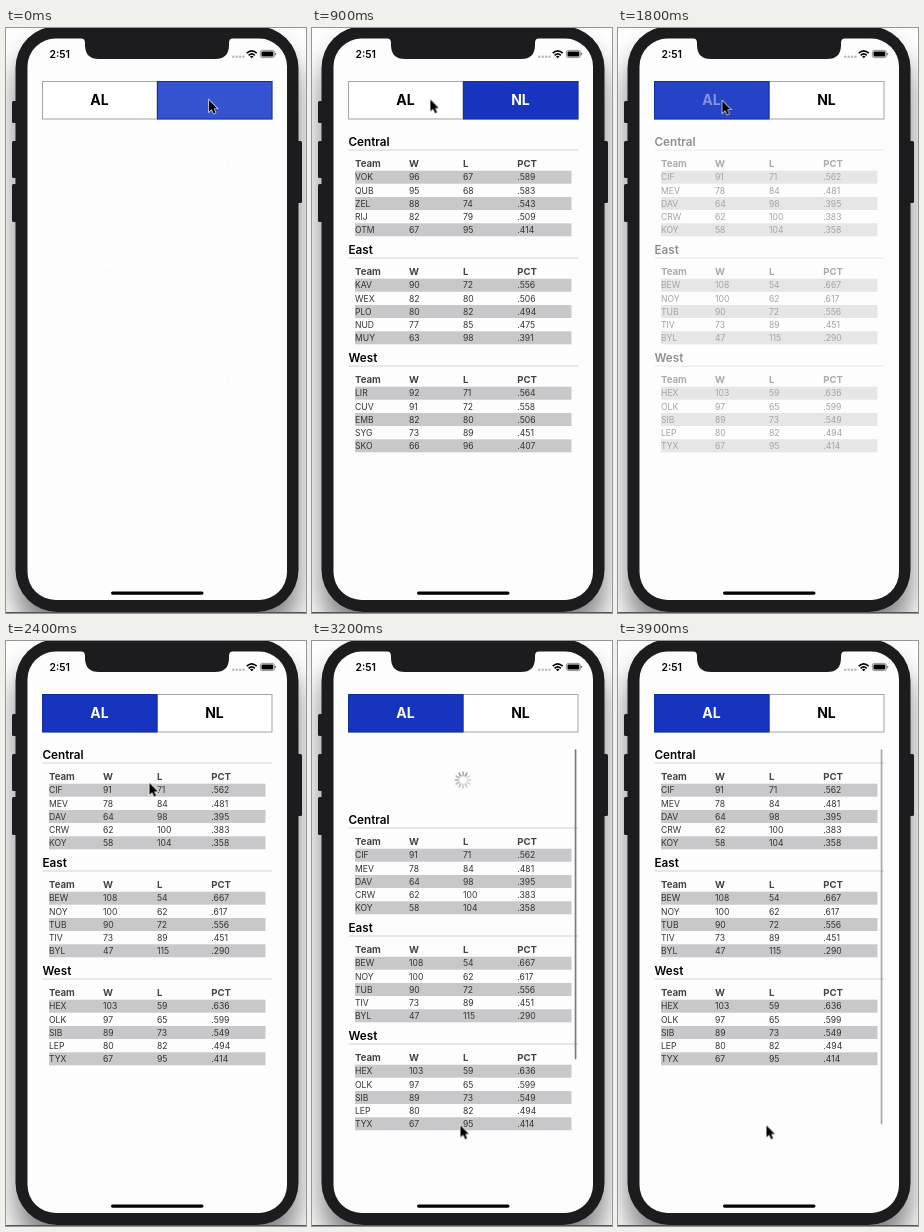
Animation of 300 by 585 pixels, one loop 4000 ms. Source, as an HTML page:

```html
<!DOCTYPE html>
<html lang="en">
<head>
<meta charset="utf-8">
<title>Standings</title>
<style>
@property --pull {
  syntax: '<length>';
  inherits: true;
  initial-value: 0px;
}
html, body {
  margin: 0;
  width: 100%;
  height: 100%;
  overflow: hidden;
  background: #fff;
}
#stage {
  position: relative;
  width: 300px;
  height: 585px;
  overflow: hidden;
  animation: pull 4s linear infinite;
}
#stage > svg { position: absolute; left: 0; top: 0; }
text { font-family: Inter, Roboto, sans-serif; }
.body { filter: drop-shadow(0 22px 14px rgba(0, 0, 0, .5)); }
.time { font-size: 10.3px; font-weight: 600; }
.label { font-size: 14px; font-weight: 700; text-anchor: middle; }
.title { font-size: 11.7px; font-weight: 600; }
.head { font-size: 9.6px; font-weight: 700; fill: #444; }
.cell { font-size: 8.6px; fill: #333; }
.stripe { fill: #c8c8ca; }
.rule { fill: #cfcfd3; }

.nl { animation: showNl 4s step-end infinite; }
.al { animation: showAl 4s step-end infinite; }
.btn { stroke: #1030a0; animation: press 4s ease-in-out infinite; }
.fade { animation: reveal 4s ease-in-out infinite; }
.al .btn, .al .fade { animation-delay: -2.5s; }
.al .list { transform: translateY(var(--pull)); }
.bar {
  fill: #7c7c80;
  height: calc(375px - var(--pull));
  animation: bar 4s linear infinite;
}
.refresh {
  position: absolute;
  left: 142px;
  top: 106px;
  width: 18px;
  height: var(--pull);
  overflow: hidden;
  animation: refresh 4s linear infinite;
}
.refresh svg {
  position: absolute;
  left: 0;
  top: calc(50% - 9px);
  animation: spin 1s steps(12) infinite;
}
.cursor { animation: cursor 4s linear infinite; }

@keyframes showNl { 0% { opacity: 1 } 37.5%, 100% { opacity: 0 } }
@keyframes showAl { 0% { opacity: 0 } 37.5%, 100% { opacity: 1 } }
@keyframes press { 0% { fill: #3552d0 } 15%, 100% { fill: #1634be } }
@keyframes reveal { 0% { opacity: .008 } 16.25%, 100% { opacity: 1 } }
@keyframes pull {
  0%, 65% { --pull: 0px }
  67.5% { --pull: 31px }
  70% { --pull: 82px }
  72.5% { --pull: 123px }
  74.5%, 75.5% { --pull: 134px; animation-timing-function: ease-out }
  80%, 81.25% { --pull: 65px; animation-timing-function: ease-in-out }
  88.75%, 100% { --pull: 0px }
}
@keyframes bar {
  0%, 65.5% { opacity: 0 }
  66.5%, 96.25% { opacity: 1 }
  100% { opacity: 0 }
}
@keyframes refresh {
  0%, 66% { opacity: 0 }
  72%, 82% { opacity: 1 }
  88.75%, 100% { opacity: 0 }
}
@keyframes spin { to { transform: rotate(360deg) } }
@keyframes cursor {
  0%, 17.5% { transform: translate(203px, 72px) }
  20% { transform: translate(162px, 72px) }
  22.5% { transform: translate(118.5px, 71.5px) }
  25% { transform: translate(109px, 72.5px) }
  30% { transform: translate(106px, 73.5px) }
  32.5%, 54% { transform: translate(104.5px, 73px) }
  57.5% { transform: translate(126px, 108px) }
  60%, 65% { transform: translate(143.5px, 142px) }
  67.5% { transform: translate(144.5px, 202px) }
  70% { transform: translate(146px, 322px) }
  72.5% { transform: translate(148px, 442px) }
  74.5%, 100% { transform: translate(148.5px, 484.5px) }
}
</style>
</head>
<body>
<div id="stage"></div>
<script>
const leagues = {
  nl: {
    Central: 'VOK 96 67 .589|QUB 95 68 .583|ZEL 88 74 .543|RIJ 82 79 .509|OTM 67 95 .414',
    East: 'KAV 90 72 .556|WEX 82 80 .506|PLO 80 82 .494|NUD 77 85 .475|MUY 63 98 .391',
    West: 'LIR 92 71 .564|CUV 91 72 .558|EMB 82 80 .506|SYG 73 89 .451|SKO 66 96 .407'
  },
  al: {
    Central: 'CIF 91 71 .562|MEV 78 84 .481|DAV 64 98 .395|CRW 62 100 .383|KOY 58 104 .358',
    East: 'BEW 108 54 .667|NOY 100 62 .617|TUB 90 72 .556|TIV 73 89 .451|BYL 47 115 .290',
    West: 'HEX 103 59 .636|OLK 97 65 .599|SIB 89 73 .549|LEP 80 82 .494|TYX 67 95 .414'
  }
};
const columns = [43, 97, 151, 205.3];
const tabs = { al: 36.5, nl: 151.5 };

const text = (cls, x, y, str, fill = '') =>
  `<text class="${cls}" x="${x}" y="${y}"${fill && ` fill="${fill}"`}>${str}</text>`;
const rect = (x, y, w, h, attrs = '') =>
  `<rect x="${x}" y="${y}" width="${w}" height="${h}" ${attrs}/>`;
const cells = (cls, y, values) =>
  values.map((v, i) => text(cls, columns[i], y, v)).join('');
const label = (id, fill) => text('label', tabs[id] + 57, 77.4, id.toUpperCase(), fill);

function section([name, rows], i) {
  const y = 108 * i;
  const lines = rows.split('|').map((row, n) => {
    const top = 142.7 + y + n * 13.15;
    const stripe = n % 2 ? '' : rect(43, top, 216.5, 13, 'class="stripe"');
    return stripe + cells('cell', top + 9.7, row.split(' '));
  });
  return text('title', 36.5, 118.4 + y, name) +
    rect(36.5, 121.5 + y, 229.5, 1, 'class="rule"') +
    cells('head', 139.2 + y, ['Team', 'W', 'L', 'PCT']) + lines.join('');
}

const tab = id =>
  rect(tabs[id], 53.5, 114.5, 37.5, 'fill="#fff" stroke="#a3a3aa"') + label(id, '#000');

const page = id => `<g class="${id}">
  ${rect(tabs[id], 53.5, 114.5, 37.5, 'class="btn"')}
  <g class="fade">${label(id, '#fff')}</g>
  <g class="fade list">${Object.entries(leagues[id]).map(section).join('')}</g>
</g>`;

const phone = `
  ${rect(9.5, -2, 283, 586, 'rx="42" fill="#1c1c1f" class="body"')}
  ${[[6, 73, 22], [6, 113, 37], [6, 156, 38], [291, 113, 62]].map(([x, y, h]) =>
    rect(x, y, 5, h, 'rx="1.5" fill="#1c1c1f"')).join('')}
  ${rect(0, 584, 300, 1, 'fill="#555"')}
  ${rect(21.5, 10.5, 259.5, 561.5, 'rx="28" fill="#fefdfe"')}
  <path d="M75 10H227Q223 10.5 223 15V17Q223 31 209 31H93Q79 31 79 17V15Q79 10.5 75 10Z" fill="#1c1c1f"/>
  ${rect(105, 563.5, 92.5, 3.2, 'rx="1.6"')}`;

const status = text('time', 43.5, 29.8, '2:51') +
  [227.3, 230.7, 234.1, 237.5].map(x => `<circle cx="${x}" cy="28.8" r="1.2" fill="#b8b8bc"/>`).join('') +
  `<g fill="none" stroke="#000" stroke-width="1.6">
    <path d="M240.7 25.2Q245.7 20.6 250.7 25.2M242.6 27.3Q245.7 24.4 248.8 27.3"/>
    ${rect(254.4, 22.4, 14, 7.2, 'rx="2" stroke="#777" stroke-width=".8"')}
  </g>
  <path d="M243.9 28.4Q245.7 26.9 247.5 28.4L245.7 30.2Z"/>
  ${rect(255.5, 23.5, 11.8, 5, 'rx="1"')}
  ${rect(269.1, 24.7, 1, 2.6, 'rx=".5" fill="#777"')}`;

const spokes = Array.from({ length: 12 }, (_, i) =>
  `<path d="M9 1V4.6" stroke-opacity="${0.35 + 0.055 * i}" transform="rotate(${i * 30} 9 9)"/>`).join('');

document.getElementById('stage').innerHTML = `
<svg width="300" height="585">
  ${phone}${status}${tab('al')}${tab('nl')}${page('nl')}${page('al')}
  ${rect(262.7, 108.3, 1.7, 375, 'rx=".85" class="bar"')}
</svg>
<div class="refresh">
  <svg width="18" height="18" stroke="#77777c" stroke-width="1.3" stroke-linecap="round">${spokes}</svg>
</div>
<svg width="300" height="585">
  <path class="cursor" d="M0 0V11.8L2.7 9.3L4.7 13.7L6.6 12.8L4.7 8.5H8.3Z" stroke="#fff" stroke-width="1.2" paint-order="stroke"/>
</svg>`;
</script>
</body>
</html>
```
